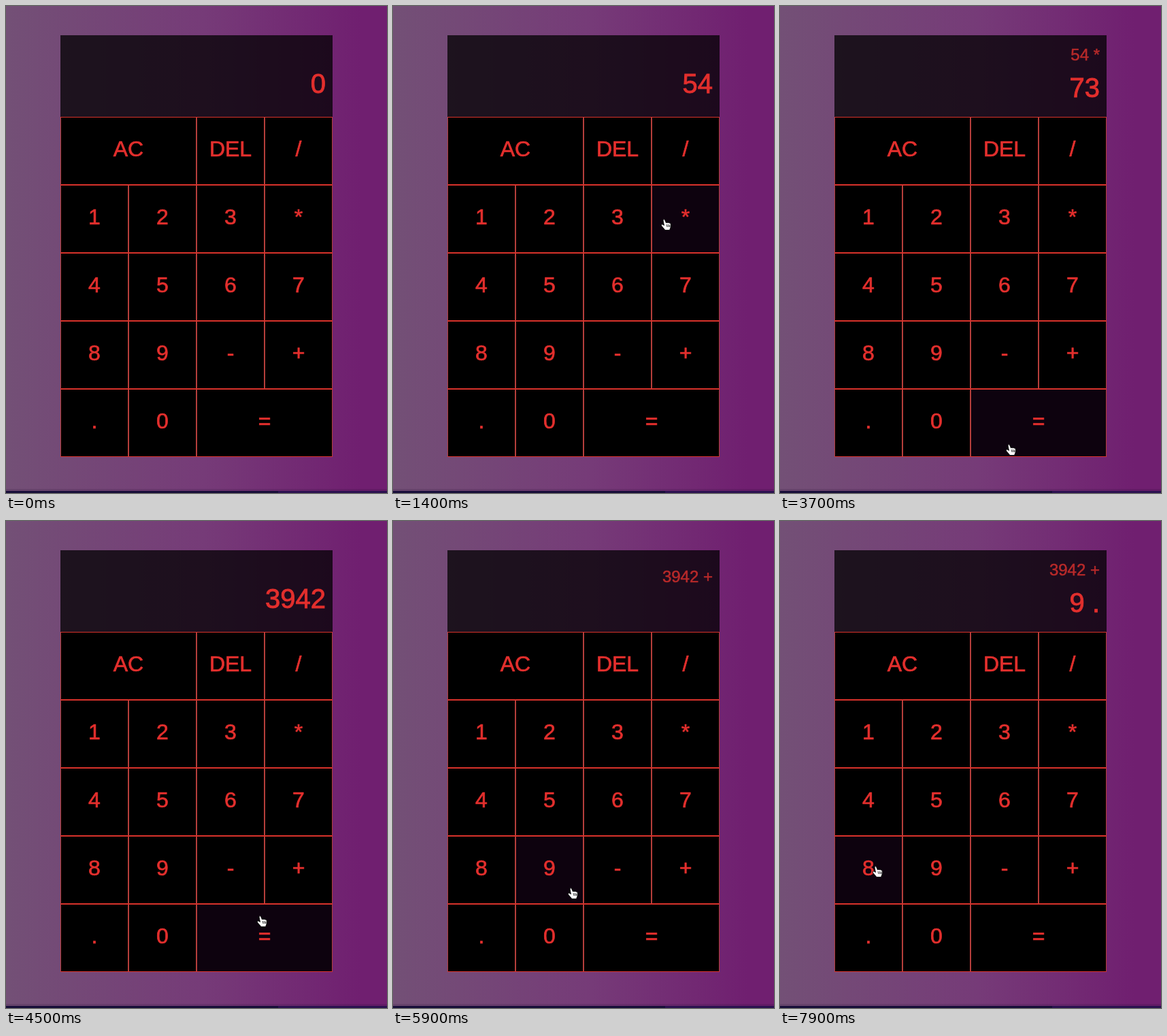
An HTML page with a canvas that plays this animation: 560 px wide and 716 px high, repeating every 8 s.

```html
<!DOCTYPE html>
<html lang="en">
<head>
<meta charset="utf-8">
<title>Calculator</title>
<style>
  html, body { margin: 0; height: 100%; overflow: hidden; background: #73387a; }
  canvas { display: block; }
</style>
</head>
<body>
<canvas id="stage" width="560" height="716"></canvas>
<script>
const ctx = document.getElementById('stage').getContext('2d');
const LOOP = 8000, STEP = 100, CELL = 100;
const FONT = 'px "Liberation Sans", Arial, sans-serif';
const RED = '#e32f2d';

// A repeated label spans two columns.
const layout = ['AC AC DEL /', '1 2 3 *', '4 5 6 7', '8 9 - +', '. 0 = ='];
const buttons = {};
layout.forEach((row, r) => row.split(' ').forEach((label, c) => {
  if (buttons[label]) buttons[label].w += CELL;
  else buttons[label] = { label, x: 80 + c * CELL, y: 163 + r * CELL, w: CELL };
}));

// Presses: key, time, fingertip offset from the button's centre
const presses = [
  ['5', 600, 0, 0], ['4', 1000, 5, 0], ['*', 2000, -32, 1], ['7', 2900, 3, -11],
  ['3', 3300, 0, 10], ['=', 4200, -44, 32], ['+', 5600, -28, 17],
  ['9', 6500, 20, 28], ['.', 7200, 5, 0], ['8', 8300, 10, -5]
];

const operate = {
  '+': (a, b) => a + b, '-': (a, b) => a - b,
  '*': (a, b) => a * b, '/': (a, b) => a / b
};

function type([previous, current], key) {
  if (key === '=') {
    const [a, op] = previous.split(' ');
    return ['', String(operate[op](+a, +current))];
  }
  if (operate[key]) return [current + ' ' + key, ''];
  if (key === '.') return [previous, current + ' .'];
  return [previous, current === '0' ? key : current + key];
}

function displayAt(t) {
  return presses.filter(p => p[1] <= t).reduce((state, p) => type(state, p[0]), ['', '0']);
}

// The fingertip spends the first 40% of each gap travelling, then rests.
function fingertipAt(t) {
  let from = [304, 724], start = 0;
  for (const [key, time, dx, dy] of presses) {
    const b = buttons[key], to = [b.x + b.w / 2 + dx, b.y + CELL / 2 + dy];
    if (t < time) {
      const u = Math.min(1, (t - start) / (time - start) / 0.4);
      const e = u * u * (3 - 2 * u);
      return from.map((v, i) => Math.round(v + (to[i] - v) * e));
    }
    from = to;
    start = time;
  }
  return from;
}

const hand = new Path2D('M-1 1Q0-1.5 1.5.5L3.5 5Q5 3.5 6 5Q7.5 3.8 8.3 5.3Q10 4.5 10.3 7' +
  'L10 11.5L8.5 15.5H2L-3.5 9Q-4.5 6.5-2 7L.5 8.5Z');
const fingers = new Path2D('M4 7L5 11M6.3 7L6.9 11M8.4 7.5L8.7 11');

const backdrop = ctx.createLinearGradient(0, 0, 560, 0);
backdrop.addColorStop(0, '#735076');
backdrop.addColorStop(0.52, '#763b78');
backdrop.addColorStop(0.93, '#701f70');

function box(color, x, y, w, h) {
  ctx.fillStyle = color;
  ctx.fillRect(x, y, w, h);
}

function text(str, x, y, size, align, color = RED) {
  ctx.font = size + FONT;
  ctx.textAlign = align;
  ctx.fillStyle = ctx.strokeStyle = color;
  ctx.lineWidth = size / 45;
  ctx.fillText(str, x, y);
  ctx.strokeText(str, x, y);
}

function drawButton({ label, x, y, w }, px, py) {
  const hover = px >= x && px < x + w && py >= y && py < y + CELL;
  box(hover ? '#0d020e' : '#000', x, y, w, CELL);
  for (const side of [x, x + w - 1]) box('#b53e3b', side, y, 1, CELL);
  for (const edge of [y, y + CELL - 1]) box('#d8322b', x, edge, w, 1);
  text(label, x + w / 2, y + 58, 32, 'center');
}

function drawHand(x, y) {
  ctx.save();
  ctx.translate(x, y);
  ctx.fillStyle = '#fff';
  ctx.strokeStyle = '#000';
  ctx.lineWidth = 0.8;
  ctx.fill(hand);
  ctx.stroke(hand);
  ctx.stroke(fingers);
  ctx.restore();
}

function draw(t) {
  const [x, y] = fingertipAt(t);
  const [previous, current] = displayAt(t);

  box(backdrop, 0, 0, 560, 716);
  box('rgba(30,10,50,.15)', 0, 710, 560, 3);
  box('#170d38', 0, 713, 400, 3);
  box('#2b1150', 400, 713, 160, 3);

  box('rgba(0,0,0,.75)', 80, 43, 400, 120);
  text(previous, 470, current ? 80 : 90, 24, 'right', '#b82a2a');
  text(current, 470, previous ? 134 : 128, 40, 'right');

  Object.values(buttons).forEach(b => drawButton(b, x, y));
  drawHand(x, y);
}

function frame(now) {
  draw(Math.floor(now % LOOP / STEP) * STEP);
  requestAnimationFrame(frame);
}
requestAnimationFrame(frame);
</script>
</body>
</html>
```
